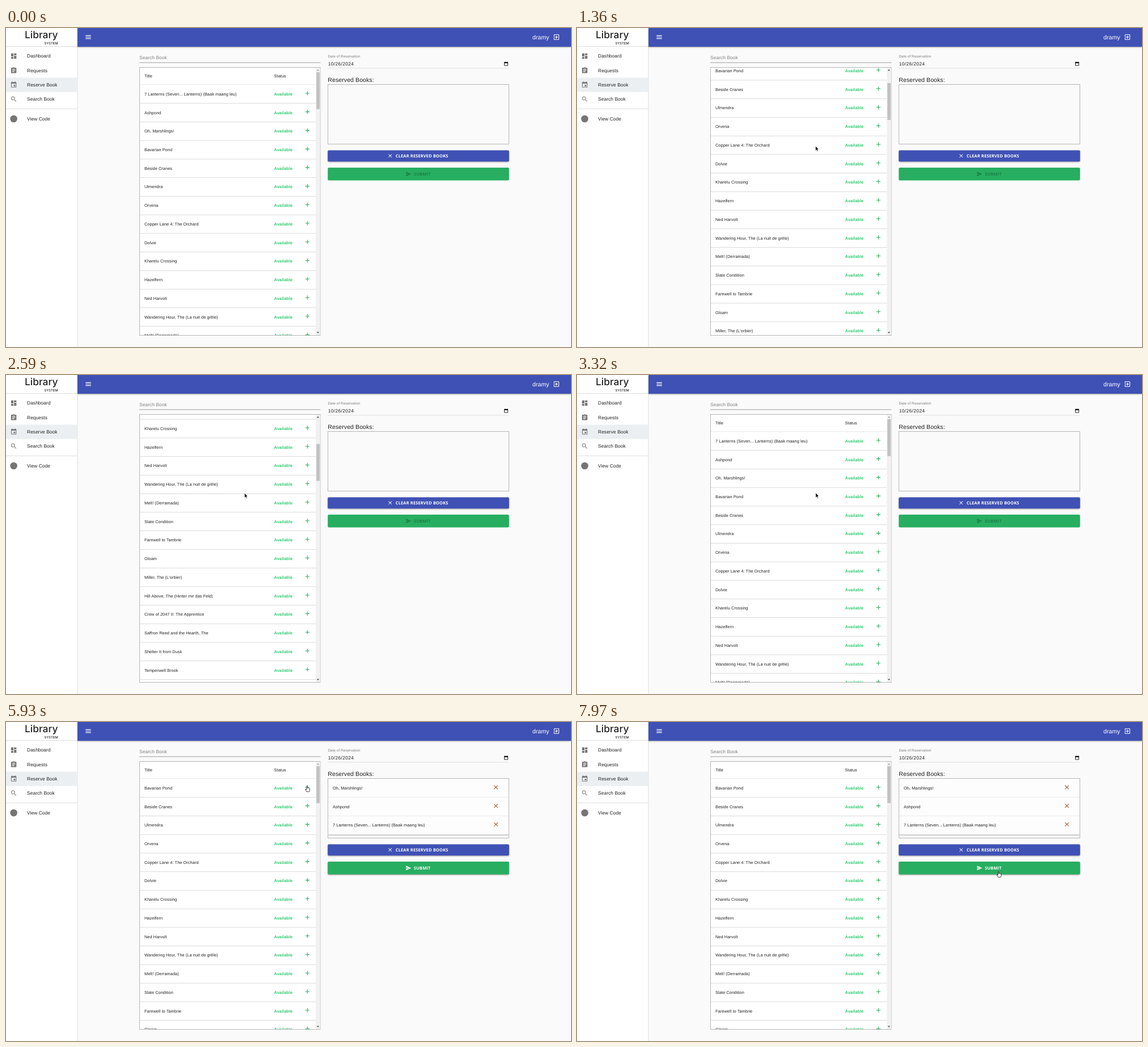
An HTML page for the animation above (8 s loop, 996x562 px).

```html
<!DOCTYPE html>
<html lang="en">
<head>
<meta charset="utf-8">
<title>Library System</title>
<style>
html, body { margin: 0; width: 100%; height: 100%; overflow: hidden; background: #fafafa; }
svg { display: block; width: 996px; height: 562px; }
text { font-family: "Liberation Sans", Arial, sans-serif; letter-spacing: .0094em; fill: #212121; text-rendering: geometricPrecision; white-space: pre; }
.logo { font-family: Inter, sans-serif; font-weight: 500; letter-spacing: 0; }
.btn { font-family: "Open Sans", sans-serif; font-weight: 700; letter-spacing: .0286em; }
.raised { filter: drop-shadow(0 1px .8px rgba(0,0,0,.38)); }
</style>
</head>
<body>
<svg id="stage" viewBox="0 0 996 562"></svg>
<script>
const titles = [
  "7 Lanterns (Seven... Lanterns) (Baak maang leu)", "Ashpond", "Oh, Marshlings!", "Bavarian Pond",
  "Beside Cranes", "Ulmendra", "Orvena", "Copper Lane 4: The Orchard", "Dolvie", "Kharelu Crossing",
  "Hazelfern", "Ned Harvolt", "Wandering Hour, The (La nuit de grêle)", "Melt! (Derramada)",
  "Slate Condition", "Farewell to Tambrie", "Gloam", "Miller, The (L'orbier)",
  "Hill Above, The (Hinter mir das Feld)", "Crew of 2047 II: The Apprentice",
  "Saffron Reed and the Hearth, The", "Shelter It from Dusk", "Temperwell Brook",
  "Hashi onna (Bridge Lady)", "Tailor's Fee", "Tailor's Barn", "Distant Kettle", "Dovecote Hymn"
];
const icons = {
  menu: "M3 18h18v-2H3v2zm0-5h18v-2H3v2zm0-7v2h18V6H3z",
  exit: "M10.09 15.59L11.5 17l5-5-5-5-1.41 1.41L12.67 11H3v2h9.67l-2.58 2.59zM19 3H5c-1.11 0-2 .9-2 2v4h2V5h14v14H5v-4H3v4c0 1.1.89 2 2 2h14c1.1 0 2-.9 2-2V5c0-1.1-.9-2-2-2z",
  dashboard: "M3 13h8V3H3v10zm0 8h8v-6H3v6zm10 0h8V11h-8v10zm0-18v6h8V3h-8z",
  requests: "M19 3h-4.18C14.4 1.84 13.3 1 12 1c-1.3 0-2.4.84-2.82 2H5c-1.1 0-2 .9-2 2v14c0 1.1.9 2 2 2h14c1.1 0 2-.9 2-2V5c0-1.1-.9-2-2-2zm-7 0c.55 0 1 .45 1 1s-.45 1-1 1-1-.45-1-1 .45-1 1-1zm2 14H7v-2h7v2zm3-4H7v-2h10v2zm0-4H7V7h10v2z",
  event: "M17 12h-5v5h5v-5zM16 1v2H8V1H6v2H5c-1.11 0-1.99.9-1.99 2L3 19c0 1.1.89 2 2 2h14c1.1 0 2-.9 2-2V5c0-1.1-.9-2-2-2h-1V1h-2zm3 18H5V8h14v11z",
  search: "M15.5 14h-.79l-.28-.27C15.41 12.59 16 11.11 16 9.5 16 5.91 13.09 3 9.5 3S3 5.91 3 9.5 5.91 16 9.5 16c1.61 0 3.09-.59 4.23-1.57l.27.28v.79l5 4.99L20.49 19l-4.99-5zm-6 0C7.01 14 5 11.99 5 9.5S7.01 5 9.5 5 14 7.01 14 9.5 11.99 14 9.5 14z",
  add: "M19 13h-6v6h-2v-6H5v-2h6V5h2v6h6v2z",
  clear: "M19 6.41L17.59 5 12 10.59 6.41 5 5 6.41 10.59 12 5 17.59 6.41 19 12 13.41 17.59 19 19 17.59 13.41 12z",
  send: "M2.01 21L23 12 2.01 3 2 10l15 2-15 2z"
};

const ROW = 32.74, TOP = 100, GREY = "#757575", BLUE = "#3f51b5", GREEN = "#27ae60";
const text = (s, x, y, size, attrs = "") => `<text x="${x}" y="${y}" font-size="${size}" ${attrs}>${s}</text>`;
const rect = (x, y, w, h, fill, attrs = "") => `<rect x="${x}" y="${y}" width="${w}" height="${h}" fill="${fill}" ${attrs}/>`;
const icon = (name, x, y, fill, s = .525) =>
  `<path d="${icons[name]}" fill="${fill}" transform="translate(${x - 12 * s} ${y - 12 * s}) scale(${s})"/>`;
const fill = c => `style="fill:${c}"`;

const navItem = ([label, name], i) => {
  const y = 49.5 + i * 25.25;
  return icon(name, 13.6, y, GREY) + text(label, 37, y + 2.9, 8.4);
};
const bookRow = title => `<g class="book">${
  text(title, 244, 18.8, 7.35)}${
  text("Available", 472.6, 18.8, 7.35, 'font-weight="700" ' + fill("#2ecc71"))}${
  icon("add", 531.3, 14.9, GREEN)}${
  rect(236, ROW - .4, 311, .8, "#d2d2d2")}</g>`;
const reservedRow = title => `<g class="reserved">${
  text(title, 576, 18.8, 7.35)}${
  icon("clear", 863.6, 14.9, "#a0522d")}${
  rect(568, ROW - .4, 318, .6, "#e0e0e0")}</g>`;

const stage = document.getElementById("stage");
stage.innerHTML = `
<clipPath id="listClip">${rect(236, 70, 311, 471, "#000")}</clipPath>
<clipPath id="boxClip">${rect(568, 100, 318, 104, "#000")}</clipPath>
${rect(0, 0, 996, 562, "#fafafa")}
${rect(0, 0, 126, 562, "#fff")}${rect(125.5, 33, .8, 529, "#d8d8d8")}
${rect(126, 0, 870, 33, BLUE, 'class="raised"')}
${text("Library", 33, 17.6, 17.4, 'class="logo"')}
${text("SYSTEM", 91.5, 28.6, 5.8, 'class="logo" text-anchor="end"')}
${rect(0, 32, 126, .8, "#d6d6d6")}
${rect(0, 87.5, 125.5, 25.2, "#eceff1")}
${[["Dashboard", "dashboard"], ["Requests", "requests"], ["Reserve Book", "event"], ["Search Book", "search"]].map(navItem).join("")}
${rect(0, 142, 126, .8, "#d6d6d6")}
<circle cx="13.6" cy="160" r="6.3" fill="${GREY}"/>
${text("View Code", 37, 162.8, 8.4)}
${icon("menu", 145, 16, "#fff")}
${text("dramy", 928, 19.7, 10.5, fill("#fff"))}
${icon("exit", 970.3, 16, "#fff")}

${text("Search Book", 235, 55.4, 8.4, fill("#808080"))}
${rect(235, 60.6, 319.5, .8, "#868686")}
${rect(235.5, 69.5, 318.5, 472, "#fff", 'stroke="#b0b0b0" stroke-width=".9"')}
<g clip-path="url(#listClip)"><g id="list">
  ${text("Title", 244, 87.3, 7.35)}${text("Status", 472.6, 87.3, 7.35)}
  ${rect(236, 99.4, 311, .7, "#dcdcdc")}
  ${titles.map(bookRow).join("")}
</g></g>
${rect(546.2, 70, 7.6, 471, "#f1f1f1")}
${rect(547.2, 77.8, 5.8, 65, "#c1c1c1", 'id="thumb"')}
<path id="up" d="M547.7 75.2h4.4l-2.2-2.4z"/>
<path d="M547.7 535.5h4.4l-2.2 2.4z" fill="#505050"/>

${text("Date of Reservation", 567.5, 52.3, 6.3, fill("#7a7a7a"))}
${text("10/26/2024", 567.7, 66, 8.4, 'letter-spacing=".38" style="letter-spacing:.38px"')}
<path d="M878.6 60.5h6v5.6h-6z" fill="none" stroke="#111" stroke-width=".9"/>
${rect(878.3, 60, 6.6, 2.1, "#111")}${rect(879.4, 59.2, 1, 1, "#111")}${rect(882.8, 59.2, 1, 1, "#111")}
${rect(567, 70.6, 319.5, .7, "#d2d2d2")}
${text("Reserved Books:", 567.3, 94.6, 10.5)}
${rect(567.5, 99.5, 319, 105, "none", 'stroke="#b0b0b0" stroke-width=".9"')}
<g clip-path="url(#boxClip)">
  ${rect(568, 100, 318, 0, "#fdfdfd", 'id="paper" class="raised"')}
  ${titles.slice(0, 3).map(reservedRow).join("")}
</g>
${rect(567.2, 215.6, 319.6, 19.6, BLUE, 'rx="2" class="raised"')}
${icon("clear", 677.2, 225.2, "#fff", .4375)}
${text("CLEAR RESERVED BOOKS", 686.8, 227.8, 7.35, 'class="btn" ' + fill("#fff"))}
${rect(567.2, 246, 319.6, 22.6, GREEN, 'id="submit" rx="2"')}
<g id="submitLabel">${icon("send", 709.5, 257.3, "inherit", .4375).replace('fill="inherit"', "")}
${text("SUBMIT", 719, 259.9, 7.35, 'class="btn" style="fill:inherit"')}</g>

<g id="cursor" stroke-linejoin="round">
  <path id="arrow" d="M0 0v8.3l1.9-1.7 1.3 2.9 1.3-.6-1.3-2.8h2.5z" fill="#000" stroke="#fff" stroke-width=".6"/>
  <path id="hand" d="M-.8 .6Q0-.5 .8 .6V4l.3-.5q.8-.4 1.2.3.9-.4 1.3.4.9-.2 1.2.6V7.6q-.3 1.3-.9 2.6H-.7Q-1.6 8.3-3 6.6-3.2 5.5-2.1 5.6L-.8 6.8z" fill="#fff" stroke="#111" stroke-width=".8"/>
</g>`;

const $ = id => document.getElementById(id);
const books = [...document.querySelectorAll(".book")];
const reserved = [...document.querySelectorAll(".reserved")];
const show = (el, on) => { el.style.display = on ? "" : "none"; };
const place = (el, x, y) => el.setAttribute("transform", `translate(${x} ${y})`);

const clicks = [4180, 4900, 5600];
const scrollKeys = [[1080, 0], [1360, 138.5], [1850, 411], [2010, 445], [2300, 445], [2590, 317], [3250, 0]];
const cursorKeys = [[350, 1000, 350], [1050, 420.5, 208], [3300, 420.5, 208], [4000, 530.6, 112.6],
  [6250, 530.6, 112.6], [7150, 743, 263.2]];
const smooth = p => p * p * (3 - 2 * p);

// Interpolates the values that follow the time in each key.
function sample(keys, t, ease = p => p) {
  if (t <= keys[0][0]) return keys[0].slice(1);
  const i = keys.findIndex(k => k[0] > t);
  if (i < 0) return keys[keys.length - 1].slice(1);
  const a = keys[i - 1], b = keys[i], p = ease((t - a[0]) / (b[0] - a[0]));
  return a.slice(1).map((v, j) => v + (b[j + 1] - v) * p);
}

function draw(t) {
  const [scroll] = sample(scrollKeys, t);
  const [x, y] = sample(cursorKeys, t, smooth);
  const n = clicks.filter(c => t >= c).length;

  place($("list"), 0, -scroll);
  books.forEach((row, i) => { show(row, i >= n); place(row, 0, TOP + (i - n) * ROW); });
  reserved.forEach((row, i) => { show(row, i < n); place(row, 0, TOP + (n - 1 - i) * ROW); });
  $("paper").setAttribute("height", n * ROW);
  $("thumb").setAttribute("y", 77.8 + scroll * .138);
  $("up").setAttribute("fill", scroll > 0 ? "#505050" : "#a3a3a3");
  $("submit").setAttribute("class", n ? "raised" : "");
  $("submitLabel").setAttribute("fill", n ? "#fff" : "#1d8147");

  const onAdd = x > 524 && x < 539 && y < 541;
  const onButton = x > 567 && x < 887 && (y > 215 && y < 235 || n > 0 && y > 246 && y < 269);
  show($("hand"), onAdd || onButton);
  show($("arrow"), !onAdd && !onButton);
  place($("cursor"), x, y);
}

function tick(now) {
  draw(now % 8000);
  requestAnimationFrame(tick);
}
draw(0);
requestAnimationFrame(tick);
</script>
</body>
</html>
```
